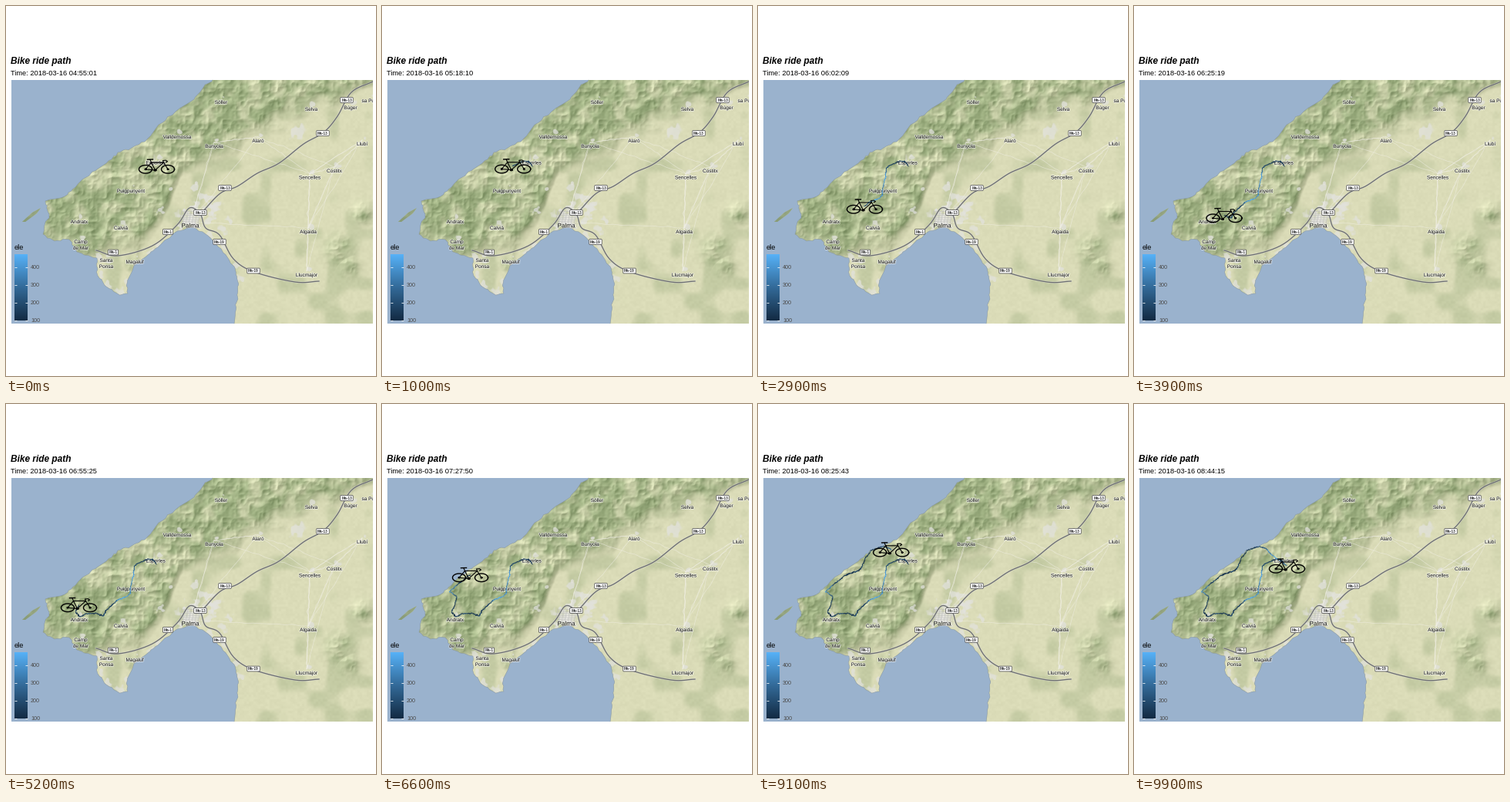
A matplotlib script for the animation above (10 s loop, 480 px wide and 480 px high).

```python
import numpy as np
import matplotlib.pyplot as plt
from matplotlib.animation import FuncAnimation
from matplotlib.collections import LineCollection
from matplotlib.colors import LinearSegmentedColormap
from matplotlib.patches import FancyBboxPatch, PathPatch, Rectangle
from matplotlib.path import Path
import matplotlib.patheffects as pe

DPI = 100
PX = 72 / DPI
FRAMES = 100
LEFT, TOP, RIGHT, BOTTOM = 7, 96, 476, 412
W, H = RIGHT - LEFT, BOTTOM - TOP
SEA = "#9ab2cd"
START = 4 * 3600 + 55 * 60 + 1
RIDE_SECONDS = 13754
rng = np.random.default_rng(16)

# Main capes and bays, counter-clockwise from the northern edge
COAST = [
    (268, 96), (257, 104), (244, 121), (220, 137), (198, 154), (180, 176),
    (163, 184), (145, 190), (130, 204), (112, 215), (90, 235), (76, 247),
    (51, 253), (56, 270), (48, 296), (63, 305), (82, 303), (92, 319),
    (118, 327), (119, 350), (130, 364), (146, 374), (158, 373), (157, 360),
    (166, 337), (184, 323), (197, 313), (222, 292), (242, 287), (262, 298),
    (279, 315), (296, 338), (300, 355), (301, 380), (296, 412),
]
ISLET = [(21, 280), (34, 268), (45, 262), (40, 269), (25, 280)]
NORTH_ROAD = [(476, 98), (448, 112), (430, 143), (412, 164), (386, 179),
              (354, 204), (326, 217), (300, 234), (278, 243), (254, 268)]
SOUTH_ROAD = [(117, 317), (145, 324), (190, 311), (222, 284), (238, 262),
              (252, 270), (259, 288), (277, 297), (295, 328), (322, 345),
              (375, 358), (406, 357)]
SHIELDS = [("Ma-13", 442, 122), ("Ma-13", 411, 165), ("Ma-13", 284, 236),
           ("Ma-13", 252, 268), ("Ma-1", 210, 293), ("Ma-1", 139, 319.5),
           ("Ma-19", 277, 306), ("Ma-19", 321, 343.5)]
PLACES = [
    ("Sóller", 279, 125), ("Selva", 396, 134), ("Búger", 447, 132),
    ("sa Pobla", 474, 123), ("Valldemossa", 222, 170), ("Bunyola", 270, 182),
    ("Alaró", 327, 175), ("Llubí", 462, 179), ("Costitx", 426, 214),
    ("Sencelles", 394, 222.5), ("Esporles", 194, 203.5),
    ("Puigpunyent", 162, 240), ("Andratx", 95, 280), ("Calvià", 149, 288),
    ("Camp", 97, 306), ("de Mar", 97, 314), ("Santa", 130, 330),
    ("Ponsa", 130, 338), ("Magaluf", 167, 332), ("Palma", 239, 285),
    ("Algaida", 392, 293), ("Llucmajor", 390, 349),
]
# Stages of the ride: tick of arrival and the bends on the way
STAGES = [
    (0, [(195.5, 208)]),
    (11, [(191, 202), (184, 201), (167, 209)]),
    (19, [(165, 223), (161.5, 237.5)]),
    (22, [(161, 246), (156.5, 250)]),
    (33, [(145, 254), (129.5, 268)]),
    (39, [(126, 275), (117, 271.5)]),
    (52, [(104, 272), (96, 276), (90, 270), (94.5, 260.5)]),
    (66, [(97, 250), (88, 243), (97, 235), (114.5, 221.5)]),
    (77, [(131, 216), (134.5, 211)]),
    (83, [(140, 199), (147.5, 189.5)]),
    (88, [(161, 185)]),
    (99, [(171, 187), (179, 196), (198.5, 210)]),
]


def smooth(t):
    t = np.clip(t, 0, 1)
    return t * t * (3 - 2 * t)


def noise(cell):
    """Value noise over the map with the given cell size in pixels."""
    grid = rng.random((int(H / cell) + 3, int(W / cell) + 3))
    y, x = np.arange(H) / cell, np.arange(W) / cell
    iy, ix = y.astype(int), x.astype(int)
    fy, fx = smooth(y - iy)[:, None], smooth(x - ix)[None, :]
    a, b = grid[np.ix_(iy, ix)], grid[np.ix_(iy, ix + 1)]
    c, d = grid[np.ix_(iy + 1, ix)], grid[np.ix_(iy + 1, ix + 1)]
    return (a * (1 - fx) + b * fx) * (1 - fy) + (c * (1 - fx) + d * fx) * fy


def ridge(cell):
    return 1 - np.abs(2 * noise(cell) - 1)


def rough(points, steps=4, amount=.8):
    """Subdivide a polyline and shake the new points a little."""
    p = np.array(points, float)
    k = np.arange(len(p))
    t = np.arange(0, len(p) - 1 + 1e-9, 1 / steps)
    q = np.column_stack([np.interp(t, k, c) for c in p.T])
    shake = rng.normal(0, amount, q.shape)
    shake[::steps] = 0
    return q + shake


def spline(points, steps=8):
    """Catmull-Rom curve through the points."""
    p = np.array(points, float)
    p = np.vstack([2 * p[0] - p[1], p, 2 * p[-1] - p[-2]])
    t = np.arange(steps)[:, None] / steps
    parts = [b + .5 * t * (c - a + t * (2 * a - 5 * b + 4 * c - d
                                        + t * (3 * (b - c) + d - a)))
             for a, b, c, d in zip(p, p[1:], p[2:], p[3:])]
    return np.vstack(parts + [p[-2:-1]])


def towns():
    """Built-up patches (x, y, radius): suburbs, the bay shore and villages."""
    patches = [(240, 274, 15), (378, 163, 9)]
    for x, y in rng.normal((246, 262), (22, 16), (24, 2)):
        patches.append((x, y, rng.uniform(2, 6)))
    for x, y in COAST[18:33]:
        patches.append((x + 3, y - 2, rng.uniform(4, 7)))
    for _, x, y in PLACES:
        patches.append((x + 3, y - 7, rng.uniform(2, 5)))
    return patches


def terrain():
    y, x = np.mgrid[TOP:BOTTOM, LEFT:RIGHT] + 0.5
    foot = np.interp(x, [170, 200, 230, 300, 370, 476],
                     [325, 282, 212, 188, 142, 92])
    relief = smooth((foot - y + 34 * (noise(22) - .5)) / 32 + .4)
    for hx, hy, r in [(432, 316, 17), (445, 337, 12), (462, 268, 13)]:
        bump = .9 * np.exp(-((x - hx) ** 2 + (y - hy) ** 2) / r ** 2)
        relief = np.maximum(relief, bump)

    height = 9 * ridge(19) + 6 * ridge(10) + 4 * ridge(6) + 1.5 * noise(3)
    gy, gx = np.gradient(height * relief)
    shade = np.clip(gx + gy, -2.6, 2.4)[..., None]

    woods = relief * (.3 + .75 * smooth(1.1 * noise(15) + .5 * noise(6) - .3))
    woods += .35 * smooth(2.6 * noise(22) - 1.3) * (1 - relief)
    woods = np.clip(woods, 0, 1)[..., None]
    rgb = np.array([219, 220, 184]) * (1 - woods) + np.array([154, 172, 126]) * woods
    rgb += shade * np.array([13, 12.5, 12])
    rgb += (noise(3)[..., None] - .5) * 7

    edge = 1.6 * (noise(4) - .5)
    for tx, ty, r in towns():
        d = np.hypot(x - tx, y - ty) / r
        k = .75 * smooth((1.1 - d + edge) * 1.5)[..., None]
        rgb = rgb * (1 - k) + np.array([226, 226, 221]) * k
    return np.clip(rgb, 0, 255).astype(np.uint8)


def text(x, y, s, px, **kw):
    kw = {"family": "Liberation Sans", "va": "baseline", "color": "black", **kw}
    return ax.text(x, y, s, fontsize=px * PX, **kw)


def draw_road(points, color, width, z, alpha=1):
    line, = ax.plot(*np.array(points).T, color=color, lw=width * PX, zorder=z,
                    alpha=alpha, solid_joinstyle="round")
    line.set_clip_path(frame)


def ride_path(sub):
    """Positions along the ride, at even speed within each stage."""
    here, when = np.array(STAGES[0][1]), 0
    out = [here]
    for tick, bends in STAGES[1:]:
        p = np.vstack([here, bends])
        dist = np.append(0, np.cumsum(np.hypot(*np.diff(p, axis=0).T)))
        n = (tick - when) * sub
        s = np.arange(1, n + 1) / n * dist[-1]
        out.append(np.column_stack([np.interp(s, dist, c) for c in p.T]))
        here, when = p[-1:], tick
    return np.vstack(out)


def climb(t):
    """Elevation at tick t: three hills over the coastal level."""
    hills = [(15, 3.5, 300), (23, 4, 330), (58, 3, 200), (94, 4.5, 280)]
    return 130 + sum(h * np.exp(-((t - c) / w) ** 2) for c, w, h in hills)


fig = plt.figure(figsize=(4.8, 4.8), dpi=DPI, facecolor="white")
ax = fig.add_axes([0, 0, 1, 1])
ax.axis("off")

# Sea and land
frame = Rectangle((LEFT, TOP), W, H, fc=SEA, ec="none", zorder=0)
ax.add_patch(frame)
coast = rough(COAST, 5, .7)
main = np.vstack([coast, (RIGHT, BOTTOM), (RIGHT, TOP)])
land = Path.make_compound_path(Path(main), Path(ISLET))
land_patch = PathPatch(land, fc="none", ec="none", transform=ax.transData)
ax.add_patch(land_patch)
base = ax.imshow(terrain(), extent=(LEFT, RIGHT, BOTTOM, TOP), zorder=1,
                 interpolation="nearest", aspect="auto")
base.set_clip_path(land_patch)
ax.plot(*coast.T, color="#8796a0", lw=.5 * PX, zorder=2)
ax.fill(*np.array(ISLET).T, color="#7e9270", alpha=.7, lw=0, zorder=2)

# Lanes tie each village of the plain to its nearest neighbours
spots = np.array([(x, y - 5) for _, x, y in PLACES if x > 230 and y > 170])
for spot in spots:
    for j in np.argsort(np.hypot(*(spots - spot).T))[1:4]:
        draw_road(rough(np.linspace(spot, spots[j], 6), 3, .7),
                  "#f4f2ea", .8, 2, .5)
for i in range(-3, 4):
    draw_road([(240 + 4 * i, 266), (237 + 4 * i, 283)], "#bdbdbb", .6, 2, .8)
    draw_road([(228, 274 + 2.6 * i), (253, 275 + 2.6 * i)], "#bdbdbb", .6, 2, .8)
for way in (NORTH_ROAD, SOUTH_ROAD):
    draw_road(spline(way), "#dcdcd6", 2.4, 3, .6)
    draw_road(spline(way), "#6c6e70", 1.3, 3)

halo = [pe.withStroke(linewidth=1.6 * PX, foreground="#ffffff", alpha=.55)]
for name, x, y in PLACES:
    label = text(x, y, name, 8.2 if name == "Palma" else 6.5, ha="center",
                 va="center_baseline", color="#222222", path_effects=halo,
                 clip_on=True, zorder=5)
    label.set_clip_path(frame)
for name, x, y in SHIELDS:
    w = 3.3 * len(name)
    ax.add_patch(FancyBboxPatch((x - w / 2, y - 3.4), w, 6.8, zorder=6,
                                boxstyle="round,pad=0,rounding_size=1",
                                fc="white", ec="#555555", lw=.8 * PX))
    text(x, y + 1.7, name, 4.7, ha="center", weight="bold", color="#333333",
         zorder=7)

# Headings
text(6, 75.3, "Bike ride path", 11.9, weight="bold", style="italic")
clock = text(6, 90.2, "", 9.25)

# Legend
blues = LinearSegmentedColormap.from_list("ele", ["#132B43", "#336A98", "#56B1F7"])
text(11, 316, "ele", 9.2, zorder=8)
ax.imshow(np.linspace(1, 0, 86)[:, None], cmap=blues, extent=(11, 28, 408, 322),
          aspect="auto", interpolation="nearest", zorder=8)
for value in (100, 200, 300, 400):
    y = 407.5 - (value - 100) * .23
    for x in (11, 24.6):
        ax.plot([x, x + 3.4], [y, y], color="white", lw=.8 * PX, zorder=9,
                solid_capstyle="butt")
    text(32, y + 2.7, str(value), 7.3, color="#4d4d4d", zorder=8)
ax.set_xlim(0, 480)
ax.set_ylim(480, 0)

# Trail, coloured by elevation
SUB = 6
route = ride_path(SUB)
track = route + rng.normal(0, .45, route.shape)
legs = np.stack([track[:-1], track[1:]], axis=1)
ele = climb(np.arange(len(legs)) / SUB) + rng.normal(0, 55, len(legs))
trail = LineCollection([], cmap=blues, lw=1.1 * PX, zorder=10)
trail.set_clim(96, 470)
ax.add_collection(trail)

# Bicycle, relative to its centre
GAP = [(np.nan, np.nan)]
HUB, CRANK, SEAT, HEAD = (14.5, 3.8), (-2, 5), (-7, -5), (9, -5)
REAR = (-HUB[0], HUB[1])
turn = np.linspace(0, 2 * np.pi, 40)


def oval(centre, rx, ry):
    ring = np.column_stack([rx * np.cos(turn), ry * np.sin(turn)]) + centre
    return ring.tolist() + GAP


TUBES = np.array(
    [SEAT, HEAD, CRANK, SEAT, REAR, CRANK] + GAP
    + [(-8.5, -8.5), SEAT] + GAP
    + [HUB, HEAD, (8, -7.5), (12, -7.8), (14, -6.3), (12, -5.2)] + GAP
    + oval(REAR, 1, .8) + oval(HUB, 1, .8))
HEAVY = np.array(oval(REAR, 8.5, 5.3) + oval(HUB, 8.5, 5.3)
                 + [(-12, -8.8), (-5, -9)] + GAP + oval(CRANK, 1.3, .9))
tubes, = ax.plot([], [], color="black", lw=1.1 * PX, zorder=11)
heavy, = ax.plot([], [], color="black", lw=1.4 * PX, zorder=11)


def update(i):
    now = START + RIDE_SECONDS * i // (FRAMES - 1)
    clock.set_text(f"Time: 2018-03-16 {now // 3600:02d}:"
                   f"{now // 60 % 60:02d}:{now % 60:02d}")
    n = i * SUB
    trail.set_segments(legs[:n])
    trail.set_array(ele[:n])
    tubes.set_data(*(TUBES + route[n]).T)
    heavy.set_data(*(HEAVY + route[n]).T)
    return clock, trail, tubes, heavy


anim = FuncAnimation(fig, update, frames=FRAMES, interval=100, repeat=True,
                     repeat_delay=0, blit=False)
plt.show()
```
